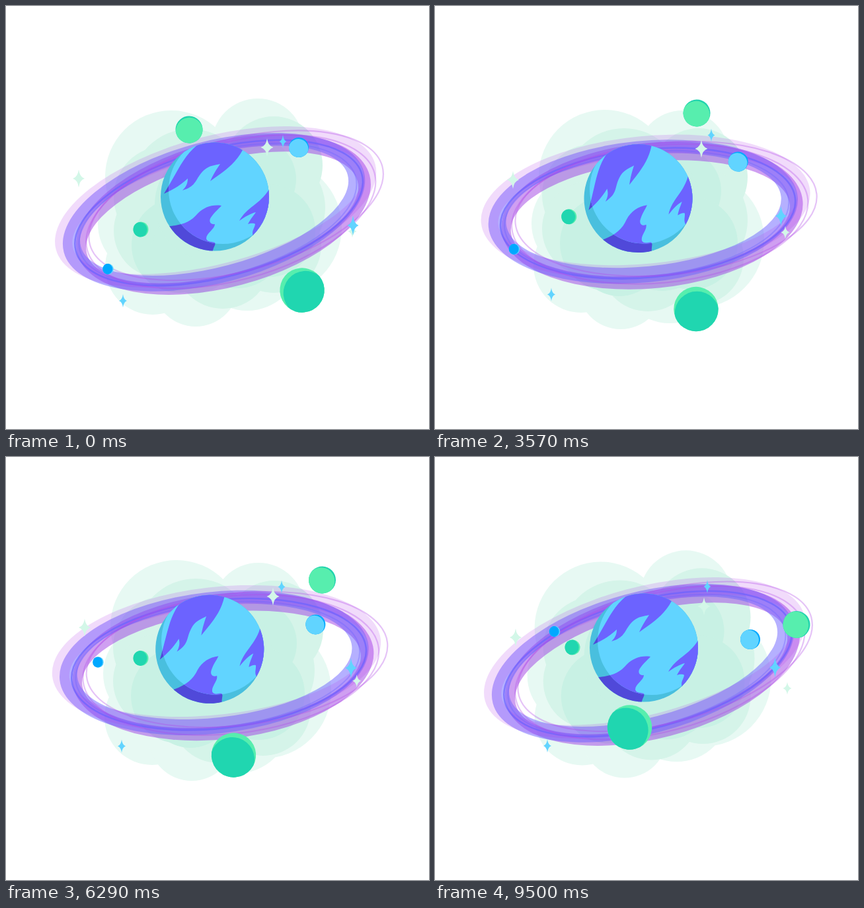
An HTML page for the animation above (9.57 s loop, 640x640 px).

```html
<!DOCTYPE html>
<html lang="en">
<head>
<meta charset="utf-8">
<title>Ringed planet</title>
<style>
  html, body { margin: 0; width: 100%; height: 100%; overflow: hidden; background: #fff; }
  svg { display: block; width: 100vw; height: 100vh; }
</style>
</head>
<body>
<svg viewBox="0 0 640 640" xmlns="http://www.w3.org/2000/svg">
  <defs>
    <clipPath id="disc"><circle r="82"/></clipPath>
    <clipPath id="lit"><circle cx="12" cy="-10.5" r="82"/></clipPath>
    <path id="star" d="M0-1Q.17-.17 1 0Q.17.17 0 1Q-.17.17-1 0Q-.17-.17 0-1Z"/>
    <g id="land" transform="translate(-316 -288.5)">
      <path d="M297 205C270 222 262 247 239 284C255 277 265 270 275 261C275 269 272 274 267 279C290 272 285 262 300 248C308 241 316 241 324 239C318 248 314 254 309 265C330 250 346 240 358 218L345 195Z"/>
      <path d="M249 333C268 331 280 326 290 314C300 304 312 300 326 302C321 308 316 311 310 320C306 326 310 331 316 330C316 338 303 343 303 352C305 358 312 356 316 358C318 362 313 364 312 376L235 376V335Z"/>
      <path d="M400 274C386 300 365 303 353 325C363 318 370 314 378 312C374 318 370 322 366 330C370 329 374 328 377 330C376 337 371 340 374 349L408 330Z"/>
    </g>
  </defs>
  <g id="clouds"></g>
  <g id="ring"></g>
  <g id="planet" clip-path="url(#disc)">
    <circle r="83" fill="#49bfde"/>
    <use href="#land" fill="#5049d9"/>
    <g clip-path="url(#lit)">
      <circle r="83" fill="#61d4ff"/>
      <use href="#land" fill="#6c63ff"/>
    </g>
  </g>
  <g id="stars"></g>
  <g id="moons"></g>
</svg>
<script>
const LOOP = 9570;
const KEYS = [0, 2210, 3570, 4570, 6290, 8430, 9500];
const CYCLE = [0, 2210, 3570, 4570, 6290, 8430, LOOP];
const ARC = [0, 4570, 9500];
const $ = id => document.getElementById(id);

function make(parent, tag, attrs) {
  const el = document.createElementNS('http://www.w3.org/2000/svg', tag);
  for (const k in attrs) el.setAttribute(k, attrs[k]);
  return parent.appendChild(el);
}

// Smooth curve through the points p at times ts, with parabolic tangents
function curve(p, ts) {
  const last = ts.length - 1;
  const rate = (i, d) => (p[i + 1][d] - p[i][d]) / (ts[i + 1] - ts[i]);
  const slope = (i, d) => {
    const m = Math.min(Math.max(i, 1), last - 1);
    const a = rate(m - 1, d), b = rate(m, d);
    const bend = (b - a) / (ts[m + 1] - ts[m - 1]);
    return a + bend * (2 * ts[i] - ts[m - 1] - ts[m]);
  };
  return time => {
    const t = Math.min(time, ts[last]);
    let i = 0;
    while (i < last - 1 && t > ts[i + 1]) i++;
    const h = ts[i + 1] - ts[i], u = (t - ts[i]) / h, v = 1 - u;
    return [0, 1].map(d =>
      p[i][d] * (1 + 2 * u) * v * v + p[i + 1][d] * u * u * (3 - 2 * u) +
      h * u * v * (slope(i, d) * v - slope(i + 1, d) * u));
  };
}

// Clouds: each puff follows one of five drifts
const drift = {
  a: [[0, 0], [15, -6], [7, -1], [-3, -6], [8, -2], [8, 6], [0, 0]],
  b: [[0, 0], [-3, 23], [-6, 18], [-11, 18], [1, 20], [-16, 17], [0, 0]],
  c: [[0, 0], [2, -3], [-1, -3], [-2, -5], [-1, -1], [8, -6], [0, 0]],
  f: [[0, 0], [-6, 10], [-6, 4], [-6, -1], [-6, 5], [-3, 6], [0, 0]],
  g: [[0, 0], [-13, 14], [-10, 19], [0, 18], [-16, 18], [4, 3], [0, 0]]
};
for (const k in drift) drift[k] = curve(drift[k], CYCLE);

const layers = {
  '#e7f9f3': [
    ['a', 250, 258, 100], ['b', 381, 210, 70], ['a', 215, 330, 76], ['c', 222, 395, 72],
    ['f', 287, 420, 65], ['g', 365, 380, 81], ['g', 405, 335, 103]],
  '#d5f4e9': [
    ['a', 279, 276, 90], ['b', 405, 241, 74], ['c', 240, 289, 77], ['c', 235, 340, 72],
    ['f', 328, 385, 73], ['g', 398, 305, 85], ['g', 405, 362, 72]],
  '#c8f1e4': [
    ['b', 375, 262, 64], ['g', 398, 340, 70], ['c', 262, 362, 72],
    ['f', 285, 370, 65], ['a', 310, 300, 85], ['f', 350, 355, 72]]
};
const puffs = [];
for (const fill in layers) {
  for (const [key, cx, cy, r] of layers[fill]) {
    puffs.push({ key, el: make($('clouds'), 'circle', { cx, cy, r, fill }) });
  }
}

// Ring: bands between two ellipses, plus thin lines
const oval = (x, y, a, b) => `M${x - a} ${y}a${a} ${b} 0 1 0 ${2 * a} 0a${a} ${b} 0 1 0 ${-2 * a} 0Z`;
function band(fill, opacity, outer, inner) {
  make($('ring'), 'path', { d: oval(...outer) + oval(...inner), fill, opacity, 'fill-rule': 'evenodd' });
}
function line(stroke, opacity, width, ...shape) {
  make($('ring'), 'path', { d: oval(...shape), fill: 'none', stroke, opacity, 'stroke-width': width });
}
band('#a040e4', .5, [10, 5, 229, 110], [7, 9, 212, 86]);
band('#6c63ff', .5, [-3, -2, 235, 107], [-2, -4, 209, 85]);
band('#b13ae6', .18, [1.5, -9, 250, 107], [4, -5, 227, 82]);
line('#6c63ff', .7, 2.5, 4, 1, 224, 97);
line('#6c63ff', .35, 2, 2, 2, 216, 94);
line('#b14ae6', .33, 2.2, 32, -3, 229, 100);
line('#b14ae6', .33, 2.2, 22, 4, 225, 104);

// Sparkles: two groups, each star scaled from its group's drift
const pale = curve([[0, 0], [12, -5], [8, 2], [8, 4], [9, -3], [11, 16], [12, 12]], KEYS);
const blue = curve([[0, 0], [-2, -7], [-1, -9.5], [-2, -7], [-2, -8.5], [-.7, -12], [-7, -9]], KEYS);
const stars = [
  [pale, 110, 261, 9, 13.5, 1], [pale, 395, 214, 9.5, 13.5, 1], [pale, 524, 341, 6.5, 9.5, .75],
  [blue, 419, 205, 5.5, 10, 1], [blue, 525, 332, 8.5, 15, 1.5], [blue, 177, 446, 6, 10, 1]
].map(([move, x, y, w, h, k]) => ({
  move, x, y, w, h, k,
  el: make($('stars'), 'use', { href: '#star', fill: move === pale ? '#d3f7e8' : '#61d4ff' })
}));

// Moons: a disc with a shifted, clipped face that turns from one angle to another
const moons = [
  [20.5, '#20d3ae', '#57eeae', 2.4, 80, 165, KEYS,
    [[277, 187], [351, 165], [396, 162], [428.5, 165.5], [478.5, 186], [528, 229], [547, 253.5]]],
  [15, '#00a8ff', '#61d4ff', 2.2, 105, 160, ARC, [[443, 214], [462.5, 242], [477, 276]]],
  [11.5, '#57eeae', '#20d6b0', 2, 165, 185, ARC, [[204, 338], [203, 313.5], [208, 288]]],
  [8.3, '#61d4ff', '#00a8ff', 1.6, 180, 180, KEYS,
    [[154.5, 398], [139.5, 383.5], [120, 368], [114, 351], [139.5, 310.5], [175, 273], [181, 264]]],
  [33.7, '#57eeae', '#20d6b0', 7, 40, 143, KEYS,
    [[448, 430], [419, 454], [395, 458.5], [377, 457.5], [344.5, 451], [309, 428.5], [294.5, 409]]]
].map(([r, fill, face, gap, from, to, times, points], i) => {
  const el = make($('moons'), 'g', {});
  make(make(el, 'clipPath', { id: 'moon' + i }), 'circle', { r });
  make(el, 'circle', { r, fill });
  const cut = make(el, 'g', { 'clip-path': `url(#moon${i})` });
  make(cut, 'circle', { cx: gap, r, fill: face });
  return { el, from, to, move: curve(points, times) };
});

const put = (el, x, y, rest = '') => el.setAttribute('transform', `translate(${x} ${y}) ${rest}`);

function draw(t) {
  const part = t / LOOP;
  const swing = (1 - Math.cos(2 * Math.PI * part)) / 2;

  for (const { key, el } of puffs) put(el, ...drift[key](t));
  put($('ring'), 318, 313, `rotate(${-15 + 11 * swing})`);
  put($('planet'), 316 - 10 * swing, 288.5 + 3 * swing, `rotate(${-19.5 * swing})`);

  for (const s of stars) {
    const [dx, dy] = s.move(t);
    put(s.el, s.x + dx * s.k, s.y + dy * s.k, `scale(${s.w} ${s.h})`);
  }
  for (const m of moons) {
    put(m.el, ...m.move(t), `rotate(${m.from + (m.to - m.from) * part})`);
  }
}

const start = performance.now();
function tick() {
  draw((performance.now() - start) % LOOP);
  requestAnimationFrame(tick);
}
tick();
</script>
</body>
</html>
```
